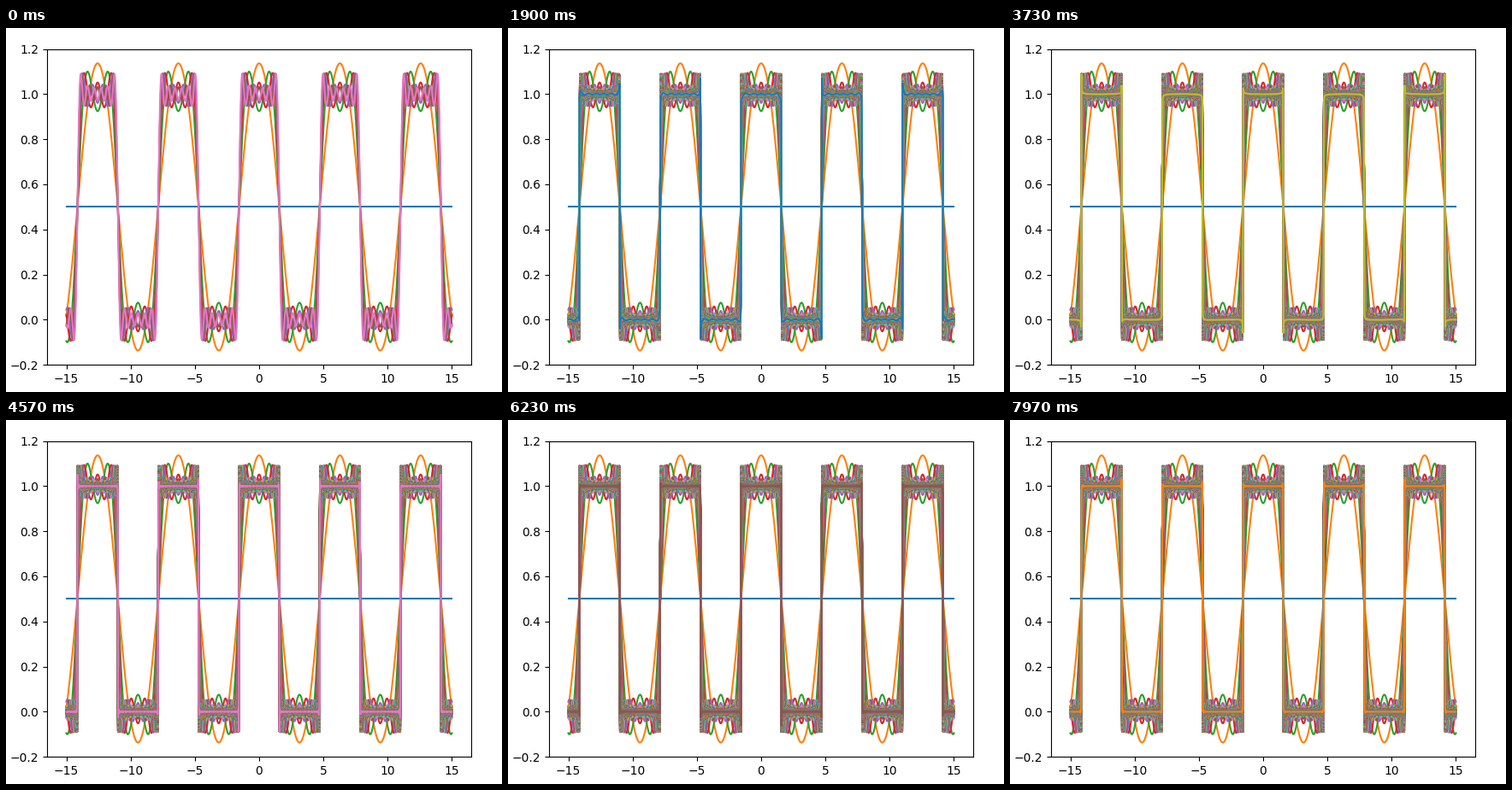
A matplotlib script that plays this animation: 580 px wide and 426 px high, repeating every 8000 ms.

```python
import matplotlib.pyplot as plt
import numpy as np
from matplotlib.animation import FuncAnimation

WIDTH, HEIGHT, DPI = 580, 426, 100
FRAMES, LOOP_MS = 240, 8000
FIRST, RATE = 6.95, 20 / 11          # newest curve at the start, curves per frame
LEFT, RIGHT, TOP, BOTTOM = 66, 526, 36, 384   # pixel window that holds the curves

fig = plt.figure(figsize=(WIDTH / DPI, HEIGHT / DPI), dpi=DPI, facecolor="white")
ax = fig.add_axes([48 / WIDTH, 31.8 / HEIGHT, 496 / WIDTH, 369.6 / HEIGHT])
ax.set_xlim(-16.5, 16.5)
ax.set_ylim(-0.2, 1.2)
ax.set_xticks(range(-15, 16, 5))
ax.set_yticks(np.arange(-0.2, 1.3, 0.2))

x = np.linspace(-15, 15, 1000)


def harmonic(k):
    """k-th odd cosine term of a 0/1 square wave."""
    m = 2 * k - 1
    return (-1) ** (k - 1) * 2 / (np.pi * m) * np.cos(m * x)


def stamp(y, n):
    """Paint one curve onto the canvas over all earlier ones."""
    line, = ax.plot(x, y, color=f"C{n % 10}", lw=1.5)
    ax.draw_artist(line)
    line.remove()


def snapshot():
    pixels = np.asarray(fig.canvas.buffer_rgba())
    return pixels[TOP:BOTTOM, LEFT:RIGHT, :3].copy()


def build_layers():
    """Accumulate the partial sums once and keep the picture for each frame."""
    fig.canvas.draw()
    layers = []
    y = np.full_like(x, 0.5)
    n = 0
    for i in range(FRAMES):
        newest = int(FIRST + RATE * i)
        while n <= newest:
            if n:
                y = y + harmonic(n)
            stamp(y, n)
            n += 1
        layers.append(snapshot())
    return layers


layers = build_layers()
picture = fig.figimage(layers[0], xo=LEFT, yo=HEIGHT - BOTTOM, origin="upper", zorder=5)


def update(i):
    picture.set_data(layers[i])
    return [picture]


anim = FuncAnimation(fig, update, frames=FRAMES, interval=LOOP_MS / FRAMES,
                     repeat=True, repeat_delay=0, blit=False)
plt.show()
```
